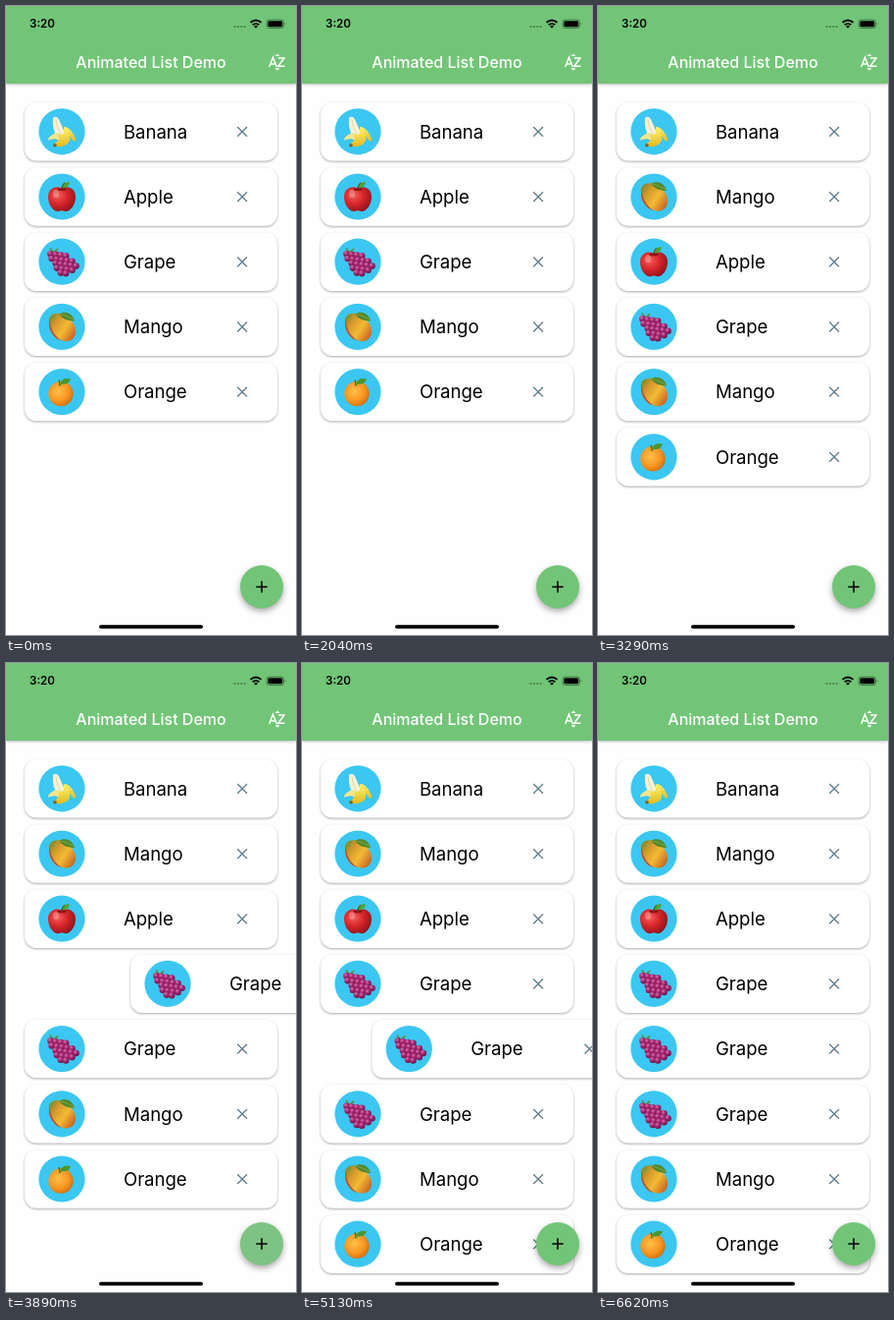
Recreate the animation shown at these times as an HTML page. Size 296 by 640 pixels, loop 6640 ms.

```html
<!DOCTYPE html>
<html lang="en">
<head>
<meta charset="utf-8">
<title>Animated List Demo</title>
<style>
  html, body { margin: 0; width: 100%; height: 100%; overflow: hidden; background: #fefefe; }
  svg { display: block; width: 296px; height: 640px; font-family: Inter, sans-serif; }
  .card { fill: #fff; filter: drop-shadow(0 1px 1px #0005); }
  .name { font-size: 18.6px; letter-spacing: -.05px; }
  .close { stroke: #607d8b; stroke-width: 1.35; }
  .bar { fill: #72c577; filter: drop-shadow(0 1px 1.5px #0004); }
  #fab circle { filter: drop-shadow(0 3px 3px #0005); }
</style>
</head>
<body>
<svg viewBox="0 0 296 640">
  <defs>
    <radialGradient id="red" cx=".35" cy=".35" r=".75">
      <stop stop-color="#f2605a"/><stop offset=".45" stop-color="#d9282c"/><stop offset="1" stop-color="#8d1018"/>
    </radialGradient>
    <radialGradient id="amber" cx=".4" cy=".4" r=".7">
      <stop stop-color="#ffc04a"/><stop offset=".6" stop-color="#f79420"/><stop offset="1" stop-color="#c96508"/>
    </radialGradient>
    <radialGradient id="berry" cx=".35" cy=".3" r=".75">
      <stop stop-color="#d873ae"/><stop offset=".45" stop-color="#a3266f"/><stop offset="1" stop-color="#641044"/>
    </radialGradient>
    <linearGradient id="ripe" x1="0" y1=".1" x2="1" y2=".8">
      <stop stop-color="#6f8a2c"/><stop offset=".3" stop-color="#d69a2d"/>
      <stop offset=".6" stop-color="#f2bb35"/><stop offset="1" stop-color="#c8601f"/>
    </linearGradient>
    <linearGradient id="peel" x2="0" y2="1">
      <stop stop-color="#fff06a"/><stop offset="1" stop-color="#e5b91e"/>
    </linearGradient>
    <g id="Banana">
      <path d="M-9-14C-5-17-3-13-2-10L4 3-3 9C-7 3-10-4-9-14Z" fill="#f7f2d9"/>
      <path d="M-6-12C-5-5-3 1 1 5" fill="none" stroke="#ddd4ac"/>
      <path d="M-4 1C-9 2-14 5-14 9-9 7-6 7-3 9Z" fill="#f4e68d"/>
      <path d="M2-5C9-4 11 1 14 7 15 10 13 11 11 9 8 4 5 2 2 1Z" fill="url(#peel)"/>
      <path d="M-4 2C0 5 3 2 3-3 9 3 10 9 5 13 1 16-5 16-7 14-8 12-4 10-3 8Z" fill="url(#peel)"/>
      <path d="M-8 12l3 1-1 3-3-1Z" fill="#7a6426"/>
    </g>
    <g id="Apple">
      <path d="M0-8C5-12 14-9 14 0 14 8 9 15 4 15 2 15 1 14 0 14-1 14-2 15-4 15-9 15-14 8-14 0-14-9-5-12 0-8Z" fill="url(#red)"/>
      <ellipse cx="0" cy="-7.5" rx="4.5" ry="1.5" fill="#8d1018"/>
      <path d="M0-7C0-10 1-12 3-14" fill="none" stroke="#6b3a17" stroke-width="1.4"/>
      <path d="M1-9C1-14 4-15 8-15 7-11 5-9 1-9Z" fill="#4fa22f"/>
      <ellipse cx="-6" cy="-3" rx="3" ry="4" fill="#fff" opacity=".25"/>
    </g>
    <g id="Grape"></g>
    <g id="Mango">
      <path d="M-13-5C-14-13-5-16 2-12 10-8 15-1 14 6 13 13 7 16 1 14-7 12-12 4-13-5Z" fill="url(#ripe)"/>
      <path d="M-12-8C-13-1-8 10 0 14-7 13-14 4-13-5Z" fill="#c44b28"/>
      <path d="M-3-13C3-17 11-14 13-6 6-6 1-8-3-13Z" fill="#54882c"/>
      <path d="M-2-13C3-12 8-10 12-7" fill="none" stroke="#8fb84f" stroke-width=".7"/>
    </g>
    <g id="Orange">
      <circle cx="-1" cy="2" r="12.7" fill="url(#amber)"/>
      <path d="M-2-8L-3-12" stroke="#5b6a20" stroke-width="1.5"/>
      <path d="M-2-8C0-14 5-14 9-13 7-8 3-7-2-8Z" fill="#4d962d"/>
      <circle cx="-2" cy="-7" r="1.3" fill="#638b28"/>
    </g>
  </defs>

  <g id="list"></g>

  <path class="bar" d="M0 0H296V79H0Z"/>
  <text x="24" y="22" font-size="11.6" font-weight="600">3:20</text>
  <path d="M232.500 21H245" stroke="#4f8a53" stroke-width="1.8" stroke-dasharray="2 1.4"/>
  <g fill="none" stroke="#000" stroke-width="1.8">
    <path d="M249.500 16.800Q255 12.200 260.500 16.800M251.700 19.300Q255 16.500 258.300 19.300"/>
  </g>
  <path d="M253 20.600Q255 19 257 20.600L255 22.700Z"/>
  <rect x="266" y="14" width="17.500" height="8.500" rx="2.500" fill="none" stroke="#36683a" stroke-width=".8"/>
  <rect x="267.300" y="15.300" width="15" height="6" rx="1.400"/>
  <path d="M284.800 16.800q1.500 1.500 0 3Z" fill="#36683a"/>
  <text x="148" y="62.700" text-anchor="middle" font-size="16" font-weight="500" fill="#fff">Animated List Demo</text>
  <g fill="none" stroke="#fff" stroke-width="1.500">
    <path d="M268.700 62L272.500 52.300 276.300 62M270 59H275M277.800 53H284L277.800 61.300H284.500"/>
  </g>
  <path d="M274.500 51L277 48.500 279.500 51ZM274.500 63.200L277 65.700 279.500 63.200Z" fill="#fff"/>

  <g id="fab">
    <circle cx="261" cy="591" r="22" fill="#72c577"/>
    <path d="M255.300 591H266.700M261 585.300V596.700" stroke="#000" stroke-width="1.600"/>
  </g>
  <rect x="95" y="629.700" width="106" height="3.800" rx="1.900"/>
</svg>
<script>
const LOOP = 6640, SLIDE = 300, TICK = 114, WIDTH = 296, PITCH = 66.2;

// "at" is when an added row may first appear, "start" is when its slide begins.
const items = [
  { name: 'Banana' },
  { name: 'Mango', at: 2830, start: 2680 },
  { name: 'Apple' },
  { name: 'Grape', at: 3660, start: 3697.5 },
  { name: 'Grape', at: 5010, start: 4877 },
  { name: 'Grape' },
  { name: 'Mango' },
  { name: 'Orange' }
];

const $ = id => document.getElementById(id);

// Rows of berries, narrowing toward the lower right.
let berries = '<path d="M-9-9L-12-14M-9-9L-4-13" stroke="#64852c" stroke-width="1.5"/>';
[4, 5, 5, 4, 2].forEach((count, row) => {
  for (let i = 0; i < count; i++) {
    const x = -11.5 + row * 2.6 + i * 5.2 - (row % 2) * 1.4;
    const y = -8 + row * 4.8 + i * .7;
    berries += `<circle cx="${x}" cy="${y}" r="3.3" fill="url(#berry)"/>`;
  }
});
$('Grape').innerHTML = berries;

$('list').innerHTML = items.map(({ name }) => `<g>
  <rect class="card" x="19" y="98" width="258" height="59.500" rx="12"/>
  <circle cx="57" cy="127.800" r="23.600" fill="#3bc7f1"/>
  <use href="#${name}" x="57" y="127.800"/>
  <text class="name" x="120" y="134.700">${name}</text>
  <path class="close" d="M236.200 123L246 132.800M246 123L236.200 132.800"/>
</g>`).join('');
const rows = [...$('list').children];
const fab = $('fab').firstElementChild;

function draw(t) {
  let row = 0;
  items.forEach(({ at = 0, start = -SLIDE }, i) => {
    const held = at + Math.floor((t - at) / TICK) * TICK;
    const shown = t >= at && held >= start;
    rows[i].style.display = shown ? '' : 'none';
    if (!shown) return;
    const x = WIDTH * Math.max(0, 1 - (held - start) / SLIDE);
    rows[i].setAttribute('transform', `translate(${x} ${row++ * PITCH})`);
  });
  fab.setAttribute('fill', t >= 3660 && t < 4000 ? '#7dc383' : '#72c577');
}

function frame() {
  draw(performance.now() % LOOP);
  requestAnimationFrame(frame);
}
frame();
</script>
</body>
</html>
```
